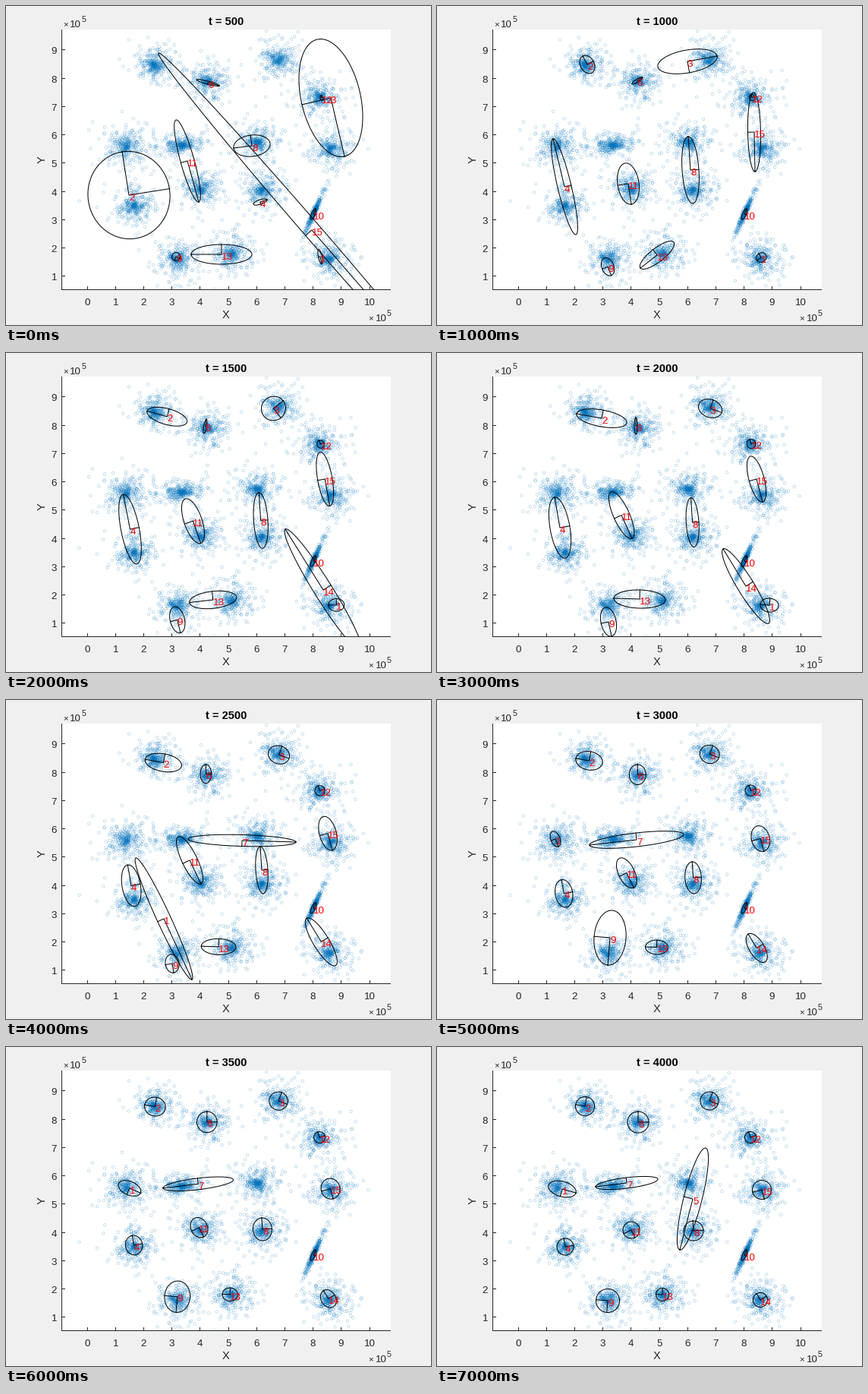
Write a matplotlib script that moves like this. It is 560 px wide and 420 px high and loops after 8000 ms.

```python
import numpy as np
import matplotlib.pyplot as plt
from matplotlib.animation import FuncAnimation
from matplotlib.patches import Rectangle

plt.rcParams["font.family"] = "Liberation Sans"
W, H, DPI = 560, 420, 100
PX = 72 / DPI  # points per pixel
LEFT, TOP, RIGHT, BOTTOM = 73.5, 31.5, 506.5, 373.5
INK = (0.15, 0.15, 0.15)
BLUE = (0, 0.447, 0.741)
STEPS = 8
LAST = STEPS - 1

fig = plt.figure(figsize=(W / DPI, H / DPI), dpi=DPI, facecolor="#f0f0f0")
ax = fig.add_axes([0, 0, 1, 1])
ax.set_xlim(0, W)
ax.set_ylim(H, 0)
ax.axis("off")
panel = ax.add_patch(Rectangle((LEFT - 0.5, TOP - 0.5), RIGHT - LEFT + 1,
                               BOTTOM - TOP + 1, fc="white", lw=0, zorder=0))


def label(x, y, s, size=13.33, color=INK, ha="center", **kw):
    """Text whose digits are centred vertically on y."""
    return ax.text(x, y + 0.35 * size, s, fontsize=size * PX, color=color,
                   ha=ha, va="baseline", **kw)


def line(xs, ys, color="black"):
    return ax.plot(xs, ys, color=color, lw=PX, zorder=3, snap=False)[0]


def draw_axes():
    line([LEFT, RIGHT], [BOTTOM, BOTTOM], INK)
    line([LEFT, LEFT], [TOP, BOTTOM], INK)
    for k in range(11):
        x = int(107 + 37.22 * k) + 0.5
        line([x, x], [BOTTOM, BOTTOM - 4], INK)
        label(x, 389, str(k))
    for k in range(1, 10):
        y = int(393 - 37.25 * k) + 0.5
        line([LEFT, LEFT + 4], [y, y], INK)
        label(67, y + 0.5, str(k), ha="right")
    label(290, 406, "X", 14.67)
    ax.text(48, 202, "Y", fontsize=14.67 * PX, color=INK, rotation=90,
            ha="center", va="center")
    for x, y in ((74, 23.5), (476.5, 410)):
        label(x + 1, y, "×", 11.5, ha="left")
        label(x + 10, y, "10", ha="left")
        label(x + 25.5, y - 6, "5", 10.67, ha="left")


# Cluster centres, keyed by the unit that settles there
HOME = {
    1: (159, 185), 2: (195, 78), 3: (359, 71), 4: (169, 263), 5: (331, 179),
    6: (265, 99), 7: (233, 183), 8: (338, 242), 9: (225, 334), 10: (406, 272),
    11: (256, 241), 12: (413, 119), 13: (297, 326), 14: (426, 333),
    15: (428, 188),
}
# Clusters that are not round: spread along, spread across, tilt in degrees
FLAT = {7: (22, 11, -15), 10: (21, 2, -66)}


def draw_points(n=333):
    rng = np.random.default_rng(4)
    for name, (x, y) in HOME.items():
        along, across, tilt = FLAT.get(name, (20, 18, 0))
        reach = rng.uniform(0.03, 1, n) ** 0.8 * 1.05
        p = rng.normal(0, along, n) * reach
        q = rng.normal(0, across, n) * reach
        c, s = np.cos(np.radians(tilt)), np.sin(np.radians(tilt))
        ax.scatter(x + c * p - s * q, y + s * p + c * q, s=(3.6 * PX) ** 2,
                   facecolors="none", edgecolors=[BLUE + (0.27,)],
                   linewidths=0.75 * PX, zorder=1).set_clip_path(panel)


tracks = {}


def unit(name, keys, radius=None):
    """Key poses by step: centre, main half axis as a vector, side half axis.

    With a radius, the unit ends as a circle on its home cluster,
    keeping the heading of its last key.
    """
    keys = {k: np.array(v, float) for k, v in keys.items()}
    if radius:
        heading = keys[max(keys)][2:4]
        heading = heading / np.hypot(*heading) * radius
        keys[LAST] = np.array([*HOME[name], *heading, radius])
    tracks[name] = keys


unit(1, {0: (414, 330, 2, 9.5, 2.5), 3: (438, 332, -12, -1, 9),
         4: (208, 288, 37, 80, 9), 5: (156, 183, 4, 10, 6),
         7: (165, 187, 18, 5, 10)})
unit(2, {0: (162, 249, -9, -57, 54), 1: (198, 77, -6, -11, 9),
         3: (217, 86, -33, -6, 11)}, 12.5)
unit(3, {0: (428, 121, 18, 77, 39), 1: (330, 73, 39, -7, 15),
         3: (360, 73, 4, -11, 16)}, 12)
unit(4, {0: (335, 258, 9, -3, 3), 1: (168, 238, -15, -63, 9),
         3: (162, 230, -7, -40, 13)}, 11)
unit(5, {7: (337, 200, -17, 67, 12)})
unit(6, {0: (266, 101, 15, 4, 2), 3: (262, 96, 0, -11, 2)}, 14)
unit(7, {4: (311, 185, 71, 2, 7.5), 5: (263, 184, -62, 7, 9),
         7: (250, 179, -41, 5, 7)})
unit(8, {0: (324, 184, -24, 3, 14), 1: (334, 216, -3, -44, 11),
         4: (337, 224, -2, -31, 8)}, 13)
unit(9, {0: (224, 330, 5, 2, 5.5), 3: (226, 354, 4, 19, 10),
         4: (219, 347, 2, 12, 9), 5: (228, 313, -3, 36, 21)}, 15.5)
unit(10, {0: (405, 274, 3, -7, 2.5)})
unit(11, {0: (239, 204, 15, 54, 9), 1: (252, 234, 4, 27, 14),
          4: (242, 211, 15, 31, 10)}, 11)
unit(12, {0: (416, 121, -1, -3, 2)}, 7.5)
unit(13, {0: (284, 327, -40, 0, 13), 1: (290, 328, -22, 17, 9),
          3: (267, 324, -34, -1, 12)}, 8.5)
unit(14, {2: (418, 312, -50, -80, 12), 3: (407, 307, -30, -49, 11)}, 9.5)
unit(15, {0: (403, 295, 202, 233, 11), 1: (418, 166, 1, 52, 8.5),
          3: (421, 166, 8, 30, 10)}, 12.5)


def pose(keys, step):
    """Eased pose between the keys on either side, or None before the first."""
    if step < min(keys):
        return None
    a = max(k for k in keys if k <= step)
    b = min((k for k in keys if k > step), default=a)
    t = (step - a) / max(b - a, 1)
    ease = 1 - (1 - t) ** 2
    return keys[a] + (keys[b] - keys[a]) * ease


def draw_unit(name, x, y, ux, uy, w):
    size = np.hypot(ux, uy)
    vx, vy = -uy / size * w, ux / size * w
    a = np.linspace(0, 2 * np.pi, 121)
    c, s = np.cos(a), np.sin(a)
    parts = [line(x + c * ux + s * vx, y + c * uy + s * vy),
             line([x + ux, x, x + vx], [y + uy, y, y + vy])]
    for p in parts:
        p.set_clip_path(panel)
    return parts + [label(x, y + 2, str(name), color="red", ha="left",
                          zorder=4)]


def draw_step(step):
    parts = [label(290, 20, f"t = {500 * (step + 1)}", 14.67, "black",
                   weight="bold")]
    for name, keys in tracks.items():
        p = pose(keys, step)
        if p is not None:
            parts += draw_unit(name, *p)
    return parts


draw_axes()
draw_points()
groups = [draw_step(step) for step in range(STEPS)]


def update(i):
    for k, group in enumerate(groups):
        for part in group:
            part.set_visible(k == i)
    return groups[i]


anim = FuncAnimation(fig, update, frames=STEPS, interval=1000,
                     init_func=lambda: update(0), repeat=True, repeat_delay=0)
plt.show()
```
